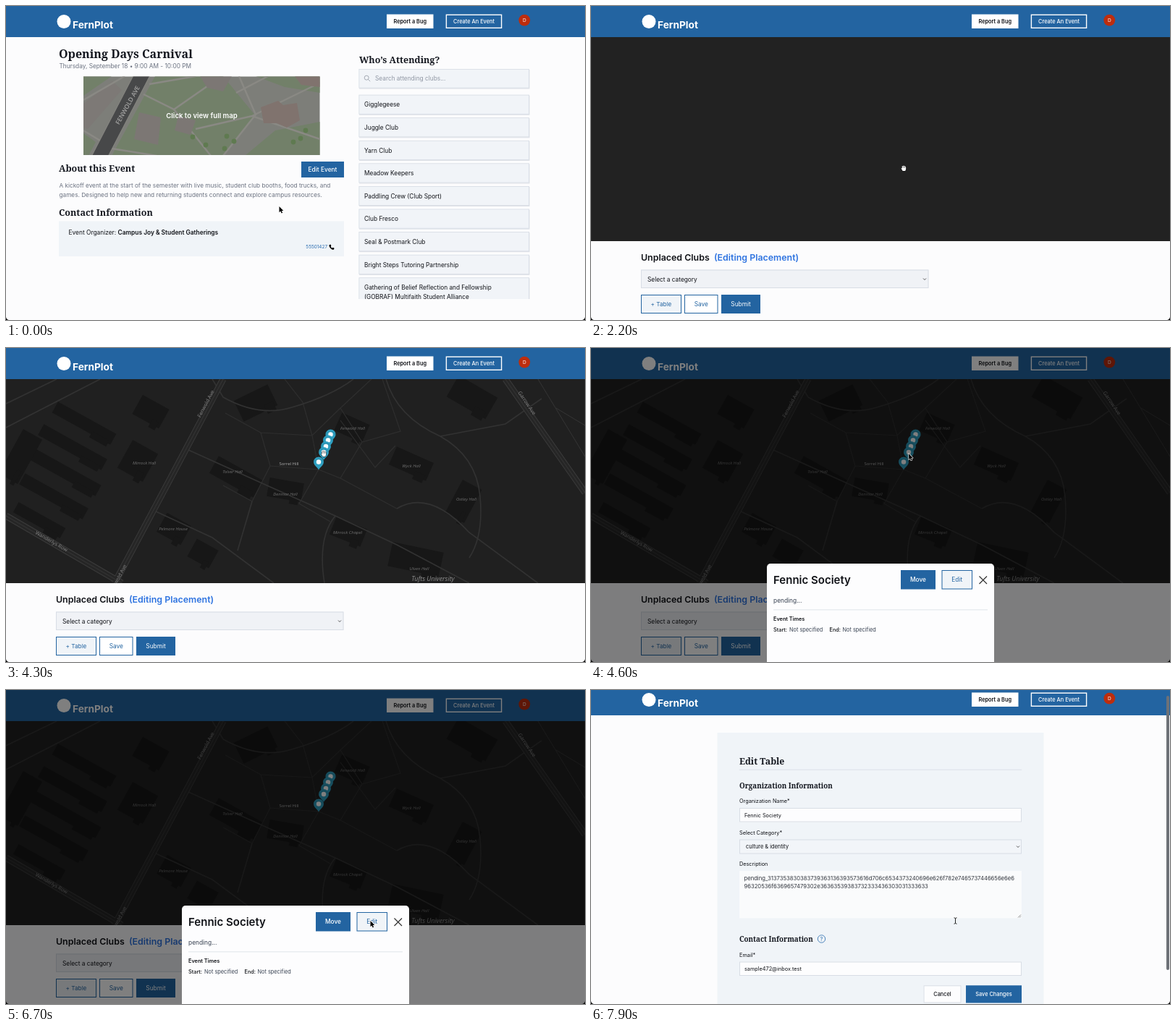
An HTML page with a canvas that plays this animation: 800x434 px, repeating every 8000 ms.

```html
<!DOCTYPE html>
<html lang="en">
<head>
<meta charset="utf-8">
<title>Event map</title>
<style>
html, body { margin: 0; width: 100%; height: 100%; overflow: hidden; background: #fcfcfd; }
canvas { display: block; width: 100vw; height: 100vh; }
</style>
</head>
<body>
<canvas id="stage"></canvas>
<script>
const W = 800, H = 434, LOOP = 8000;
const canvas = document.getElementById('stage');
const ctx = canvas.getContext('2d');
const dpr = window.devicePixelRatio || 1;
canvas.width = W * dpr;
canvas.height = H * dpr;

const SANS = 'Inter, sans-serif';
const SERIF = '"Noto Serif", serif';
const MAP_FONT = '"Open Sans", sans-serif';
const BLUE = '#2364a1', PAGE = '#fcfcfd', PANEL = '#f0f4f8', LINE = '#d8dde5', INK = '#111318';

const clamp = v => Math.max(0, Math.min(1, v));
const span = (t, a, b) => clamp((t - a) / (b - a));
const smooth = p => p * p * (3 - 2 * p);
const easeOut = p => 1 - (1 - p) ** 3;

// y is the middle of the capitals
function text(str, x, y, size, o = {}) {
  ctx.font = `${o.style || 'normal'} ${o.weight || 400} ${size}px ${o.font || SANS}`;
  ctx.textAlign = o.align || 'left';
  ctx.fillStyle = o.color || INK;
  ctx.fillText(str, x, y + size * 0.36);
  return ctx.measureText(str).width;
}

const title = (str, x, y, size) => text(str, x, y, size, { font: SERIF, weight: 600, color: '#14171f' });

function turned(str, x, y, deg, size, o) {
  ctx.save();
  ctx.translate(x, y);
  ctx.rotate(deg * Math.PI / 180);
  text(str, 0, 0, size, { align: 'center', ...o });
  ctx.restore();
}

// edges given as left, top, right, bottom
function box(l, t, r, b, fill, border, width = 1) {
  if (fill) {
    ctx.fillStyle = fill;
    ctx.fillRect(l, t, r - l, b - t);
  }
  if (border) {
    ctx.strokeStyle = border;
    ctx.lineWidth = width;
    ctx.strokeRect(l + width / 2, t + width / 2, r - l - width, b - t - width);
  }
}

function button(l, t, r, b, label, size, fill, color, border, weight = 500, width = 1) {
  box(l, t, r, b, fill, border, width);
  text(label, (l + r) / 2, (t + b) / 2, size, { align: 'center', color, weight });
}

function dot(x, y, r, fill) {
  ctx.fillStyle = fill;
  ctx.beginPath();
  ctx.arc(x, y, r, 0, 7);
  ctx.fill();
}

function stroke(d, color, width) {
  ctx.strokeStyle = color;
  ctx.lineWidth = width;
  ctx.stroke(new Path2D(d));
}

function fill(d, color) {
  ctx.fillStyle = color;
  ctx.fill(new Path2D(d));
}

function clipped(l, t, r, b, draw) {
  ctx.save();
  ctx.beginPath();
  ctx.rect(l, t, r - l, b - t);
  ctx.clip();
  draw();
  ctx.restore();
}

function chevron(x, y) {
  stroke(`M${x - 2} ${y - 1}l2 2l2 -2`, '#444', 0.9);
}

function header() {
  box(0, 0, W, 43, BLUE);
  dot(80, 21.5, 9.5, '#fff');
  text('FernPlot', 92, 26.3, 13.7, { weight: 700, color: '#fff' });
  button(526, 11.5, 590.5, 31, 'Report a Bug', 7.35, '#fff', INK, null, 600);
  button(607.7, 11.5, 685.3, 31, 'Create An Event', 7.4, null, '#fff', '#fff', 500, 1.4);
  dot(716.3, 19.6, 7.9, '#bd2d0e');
  text('D', 716.3, 19.6, 6.6, { align: 'center', color: '#fff' });
}

function thumbnail() {
  clipped(107, 97.5, 433.5, 206, () => {
    box(107, 97, 434, 207, '#7d7e79');
    fill('M206 97L300 97L345 152L300 207L146 207Z M345 97L434 97L434 120L385 112Z M330 207L372 172L434 160L434 207Z', '#728069');
    fill('M107 97L146 97L107 124Z M107 176L124 188L114 207L107 207Z', '#728069');
    fill('M107 135L147 104L160 116L113 170L107 168Z', '#7d7976');
    stroke('M107 130L164 97 M107 172L130 186 M146 197L208 207 M190 122L232 143L283 207 M198 108L262 97 M232 143L298 97 M262 170L340 152L434 184 M300 207L345 150L322 97 M340 152L434 106 M318 120L362 97', '#8a8984', 2.4);
    fill('M184 147L214 154L210 192L177 184Z M268 97L312 97L300 118L278 113Z M238 152L262 158L255 178L233 172Z', '#7c7774');
    fill('M352 140L376 131L383 137L402 134L406 158L388 168L374 162L356 162Z M399 97L434 97L434 112L408 109Z', '#80736e');
    fill('M176 97L198 97L141 207L119 207Z', '#474849');
    stroke('M175.5 97L118.5 207 M198.5 97L141.5 207', '#868581', 0.8);
    for (const p of ['258 181', '276 192', '305 180', '302 197', '315 187', '397 188', '407 183', '414 172']) {
      const [x, y] = p.split(' ').map(Number);
      dot(x, y, 3.4, '#5f7a50');
    }
    turned('FENWOLD AVE', 168, 137, -61, 8.6, { weight: 600, color: '#a5a5a4', font: MAP_FONT });
  });
  text('Click to view full map', 270.5, 152, 9.6, { weight: 600, color: '#fff', align: 'center' });
}

const clubs = ['Gigglegeese', 'Juggle Club', 'Yarn Club', 'Meadow Keepers', 'Paddling Crew (Club Sport)',
  'Club Fresco', 'Seal & Postmark Club', 'Bright Steps Tutoring Partnership',
  'Gathering of Belief Reflection and Fellowship'];

function card(t, b) {
  box(488, t + 1, 723.5, b + 1, '#dadee4');
  box(487.5, t, 723, b, '#f1f4f8', LINE, 0.8);
}

function eventPage() {
  header();
  title('Opening Days Carnival', 73, 66.5, 16);
  text('Thursday, September 18 • 9:00 AM - 10:00 PM', 73.5, 82.7, 8.28, { color: '#6b7280' });
  thumbnail();
  title('About this Event', 73, 224.5, 12.5);
  button(408, 215, 467, 237, 'Edit Event', 8.4, BLUE, '#fff');
  const grey = { color: '#6b7280' };
  text('A kickoff event at the start of the semester with live music, student club booths, food trucks, and', 73.5, 248, 8.22, grey);
  text('games. Designed to help new and returning students connect and explore campus resources.', 73.5, 261.3, 8.22, grey);
  title('Contact Information', 73, 285.5, 12.5);
  box(73, 297.5, 467, 346, PANEL);
  const w = text('Event Organizer: ', 86.5, 313, 8.4);
  text('Campus Joy & Student Gatherings', 86.5 + w, 313, 8.4, { weight: 600 });
  text('55501427', 444, 333, 6.4, { color: '#2a6cb0', align: 'right' });
  fill('M446.6 330.2L448.5 329.6L449.4 331.8L448.6 332.6Q449.3 334 450.7 334.7L451.5 333.8L453.6 334.8L453 336.6Q451.8 337.2 450 336.2Q447 334.6 446.4 331.6Z', '#000');

  title('Who’s Attending?', 488, 74, 12.5);
  card(87, 113.5);
  stroke('M501.2 99.2a3 3 0 1 1 -6 0a3 3 0 1 1 6 0 M500.4 101.4l2.8 2.8', '#858b97', 0.7);
  text('Search attending clubs...', 510, 100.3, 8.3, { color: '#8f96a3' });
  clipped(480, 118, 730, 405, () => {
    clubs.forEach((name, i) => {
      const y = 122.7 + i * 31.58;
      card(y, y + (i < 8 ? 27 : 42));
      text(name, 495, y + 13.8, 8.3);
    });
    text('(GOBRAF) Multifaith Student Alliance', 495, 402.3, 8.3);
  });
}

// centre x, centre y, width, height, tilt
const buildings = [
  [108, 104, 92, 17, 29], [92, 137, 100, 17, 29], [82, 172, 104, 17, 29], [66, 205, 100, 17, 29], [46, 238, 74, 16, 29],
  [200, 88, 42, 30, 29], [345, 76, 52, 32, -26], [182, 156, 40, 44, 29], [478, 110, 42, 27, 24], [318, 178, 70, 27, 29],
  [386, 196, 48, 26, 10], [560, 160, 56, 27, 24], [632, 212, 30, 52, 28], [473, 254, 46, 26, 22], [566, 292, 72, 34, 12],
  [232, 250, 38, 30, 29], [272, 284, 34, 28, 29], [644, 68, 62, 34, 30], [20, 150, 30, 70, 29]
];

const mapLabels = [
  ['Fenwold Hall', 479, 111], ['Mirrock Hall', 191, 159], ['Tolver Hall', 313, 171], ['Wyck Hall', 560, 163],
  ['Denmor Hall', 386, 202], ['Ostley Hall', 636, 209], ['Pelmore House', 231, 250], ['Mirrock Chapel', 472, 255],
  ['Ulven Hall', 571, 305]
];

function pin(x, y) {
  fill(`M${x} ${y + 11}C${x - 2} ${y + 7} ${x - 7} ${y + 4.5} ${x - 7} ${y}A7 7 0 0 1 ${x + 7} ${y}C${x + 7} ${y + 4.5} ${x + 2} ${y + 7} ${x} ${y + 11}Z`, '#2f9fc0');
  stroke(`M${x - 6.6} ${y + 1.5}A6.7 6.7 0 0 1 ${x + 6.6} ${y + 1.5}`, '#2585a3', 0.7);
  dot(x, y, 3.2, '#fff');
}

function campus() {
  box(0, 43, W, 325, '#202020');
  for (const [x, y, w, h, deg] of buildings) {
    ctx.save();
    ctx.translate(x, y);
    ctx.rotate(deg * Math.PI / 180);
    box(-w / 2, -h / 2, w / 2, h / 2, '#171717');
    box(w / 6, h / 4, w / 2 - 4, h / 2 + 5, '#171717');
    ctx.restore();
  }
  stroke('M303 90L352 117L423 121L462 83L505 43 M352 117L365 163L340 212L300 190 M365 163L432 168L462 180 M423 121L432 168L405 215L448 240 M385 43L410 75L423 121 M462 83L492 130L462 180L540 222 M492 130L545 115L520 43 M462 100L510 165L538 135', '#2e2e2e', 1.2);
  stroke('M250 140L365 192L455 232L540 272L640 325 M285 43L300 68Q350 96 395 82Q450 66 480 43 M525 43Q540 95 600 122Q650 150 655 205Q660 260 640 290 M455 232Q430 262 440 325 M540 222Q585 195 640 255L735 325 M600 122L690 105L740 70 M205 225L285 262L370 325 M340 212L320 280 M0 77L70 43 M0 110L130 43', '#323232', 1.6);
  stroke('M760 83L800 107 M735 43L800 150', '#3a3a3a', 0.8);
  const roads = 'M300 43L222 190L150 325 M0 232L160 325 M690 43L800 200';
  stroke(roads, '#3b3b3b', 9);
  stroke(roads, '#262626', 7);
  stroke(roads, '#363636', 1);

  const street = { color: '#858585', font: MAP_FONT };
  turned('Fenwold Ave', 276, 77, -62, 7, street);
  turned('Fenwold Ave', 155, 318, -62, 7, street);
  turned('Wanderlys Row', 63, 267, 30, 7, street);
  turned('Garrow Ave', 720, 76, 56, 7, street);
  for (const [name, x, y] of mapLabels)
    text(name, x, y, 6, { style: 'italic', align: 'center', color: '#707070', font: MAP_FONT });
  text('Sorrel Hill', 391, 159.5, 6, { align: 'center', color: '#b0b0b0', font: MAP_FONT });
  text('Tufts University', 590, 319, 8.9, { style: 'italic', align: 'center', color: '#8f8f8f', font: MAP_FONT });
  pin(448.5, 119.5);
  pin(445, 127.5);
  pin(442, 136);
  pin(439, 144);
  pin(432, 157.5);
}

function mapPage(t) {
  box(0, 43, W, 325, '#222');
  const shown = span(t, 2250, 2450);
  if (shown > 0) {
    ctx.globalAlpha = shown;
    clipped(0, 43, W, 325, campus);
    ctx.globalAlpha = 1;
  }
  header();
  text('Unplaced Clubs', 69, 348, 12.4, { weight: 600 });
  text('(Editing Placement)', 170, 348, 12.4, { weight: 600, color: '#2f74e0' });
  box(69, 364.5, 466.5, 390, '#f0f2f6', LINE);
  text('Select a category', 78, 377.7, 8.3);
  chevron(461, 377.5);
  button(69, 399, 125, 425, '+ Table', 8.2, PANEL, BLUE, BLUE, 400);
  button(129, 399, 175.5, 425, 'Save', 8.3, '#fff', BLUE, BLUE, 400);
  button(180, 399, 234, 425, 'Submit', 8.3, BLUE, '#fff', null, 400);
}

function modal(t) {
  const p = easeOut(span(t, 4340, 4600));
  if (p <= 0) return;
  box(0, 0, W, H, `rgba(0,0,0,${0.5 * p})`);
  ctx.save();
  ctx.translate(0, (1 - p) * 136);
  ctx.fillStyle = '#fdfdfe';
  ctx.beginPath();
  ctx.roundRect(243, 298, 314, 145, 5);
  ctx.fill();
  text('Fennic Society', 252, 321, 15, { weight: 600 });
  button(428, 307, 476, 333.5, 'Move', 8.3, BLUE, '#fff');
  button(484.5, 307, 527, 333.5, 'Edit', 8.3, PANEL, BLUE, BLUE, 400);
  stroke('M536.5 315.5l10.5 10.5m0 -10.5l-10.5 10.5', '#333', 1.2);
  text('pending...', 252, 349, 8.4, { color: '#374151' });
  box(252, 361.5, 548, 362.3, LINE);
  text('Event Times', 252, 374, 7.3, { weight: 600 });
  text('Start:', 252, 389.5, 7.3, { weight: 500 });
  text('Not specified', 274, 389.5, 7.35, { color: '#374151' });
  text('End:', 329.5, 389.5, 7.3, { weight: 500 });
  text('Not specified', 347.5, 389.5, 7.35, { color: '#374151' });
  ctx.restore();
}

const email = 'sample472@inbox.test';
const club = 'Fennic Society';
const token = [...`1758087961695${email}${club}0.6659872346001363`]
  .map(c => c.charCodeAt(0).toString(16)).join('');

function editPage(t) {
  const scroll = 8 * smooth(span(t, 7450, 7900));
  ctx.save();
  ctx.translate(0, 8 - scroll);
  ctx.save();
  ctx.translate(0, -8);
  header();
  ctx.restore();
  box(174.5, 59, 625.5, 460, PANEL);
  title('Edit Table', 205, 98.5, 12.2);
  box(205, 109.8, 595, 110.6, LINE);
  title('Organization Information', 205, 132, 9.8);
  text('Organization Name*', 205, 153.2, 7.3);
  box(205, 163, 595, 182.5, '#fdfdfe', LINE);
  text(club, 212, 173, 7.3);
  text('Select Category*', 205, 197, 7.3);
  box(205, 206.5, 595, 226.5, '#f2f5f9', LINE);
  text('culture & identity', 214, 216.5, 7.4);
  chevron(590, 216.5);
  text('Description', 205, 240.7, 7.3);
  box(205, 250, 595, 315.5, '#fafbfc');
  text('pending_' + token.slice(0, 75), 211.5, 260.5, 7.65, { color: '#30343c' });
  text(token.slice(75), 211.5, 271.3, 7.65, { color: '#30343c' });
  stroke('M590 314.5l4 -4m-1.8 4l1.8 -1.8', '#666', 0.7);
  title('Contact Information', 205, 344.5, 9.8);
  stroke('M323.7 344a5.2 5.2 0 1 1 -10.4 0a5.2 5.2 0 1 1 10.4 0', '#3a78b5', 0.9);
  text('?', 318.5, 344, 7.2, { align: 'center', color: '#3a78b5', weight: 500 });
  text('Email*', 205, 366, 7.3);
  box(205, 375.5, 595, 395, '#fdfdfe', LINE);
  text(email, 212, 385.6, 7.3);
  button(459.5, 408.3, 511.5, 432.5, 'Cancel', 7.35, '#fdfdfe', INK, LINE);
  button(518, 408.3, 595, 432.5, 'Save Changes', 7.35, BLUE, '#fff');
  ctx.restore();

  if (scroll > 0) {
    ctx.fillStyle = '#6d7177';
    ctx.beginPath();
    ctx.roundRect(795, 1 + scroll * 0.87, 4, 379, 2);
    ctx.fill();
  }
}

// time, x, y: the pointer glides from each stop to the next
const stops = [
  [0, 377.5, 277], [850, 377.5, 277], [1600, 433, 228], [2050, 433, 228], [2150, 432, 224],
  [2700, 432, 224], [3800, 439, 146], [5000, 439, 146], [6100, 503.5, 319], [LOOP, 503.5, 319]
];

function pointerAt(t) {
  const i = stops.findIndex((s, k) => k > 0 && t <= s[0]);
  const [t0, x0, y0] = stops[i - 1], [t1, x1, y1] = stops[i];
  const p = smooth(span(t, t0, t1));
  return [x0 + (x1 - x0) * p, y0 + (y1 - y0) * p];
}

function outlined(d, inside, edge, width) {
  ctx.lineJoin = 'round';
  stroke(d, edge, width);
  fill(d, inside);
  ctx.lineJoin = 'miter';
}

const shapes = {
  arrow: () => outlined('M0 0V8.2L1.9 6.5L3.2 9.4L4.6 8.8L3.3 6H5.8Z', '#000', '#fff', 1.2),
  finger: () => outlined('M-1.4 -3.6Q-.6 -4.6 .2 -3.6V-1Q2 -1.4 3.6 -.2Q4 1.4 3 4H-1.4L-3.6 1Q-3.2 0 -1.4 1Z', '#fff', '#000', 1),
  hand: () => {
    outlined('M-2.4 -2.4Q-1.6 -3.6 -1 -2.6Q-.4 -4.4 .5 -2.9Q1.4 -3.8 1.9 -2.2Q3 -2.6 3.2 -1V1.4L2.2 4H-1.3L-3.6 .6Q-3.2 -.4 -2.2 .4Z', '#fff', '#000', 0.9);
    stroke('M-.9 -2.4V-.4M.5 -2.7V-.4M1.9 -2V-.2', '#222', 0.5);
  },
  beam: () => stroke('M-2 -4.2Q0 -4.2 0 -3V3Q0 4.2 -2 4.2M2 -4.2Q0 -4.2 0 -3V3Q0 4.2 2 4.2', '#222', 0.9)
};

function pointer(t) {
  const [x, y] = pointerAt(t);
  let kind = 'arrow';
  if (t >= 6850) kind = 'beam';
  else if (t >= 2050 && t < 4350) kind = 'hand';
  else if (t < 2050 && x > 408 && y < 237) kind = 'finger';
  ctx.save();
  ctx.translate(x, y);
  shapes[kind]();
  ctx.restore();
}

function corners() {
  fill('M0 429.5A4.5 4.5 0 0 0 4.5 434H0Z M800 429.5A4.5 4.5 0 0 1 795.5 434H800Z', '#000');
}

function draw(t) {
  ctx.setTransform(dpr, 0, 0, dpr, 0, 0);
  box(0, 0, W, H, PAGE);
  if (t < 2050) eventPage();
  else if (t < 6850) {
    mapPage(t);
    modal(t);
  } else editPage(t);
  pointer(t);
  corners();
}

const start = performance.now();
function tick() {
  draw((performance.now() - start) % LOOP);
  requestAnimationFrame(tick);
}
tick();
</script>
</body>
</html>
```
